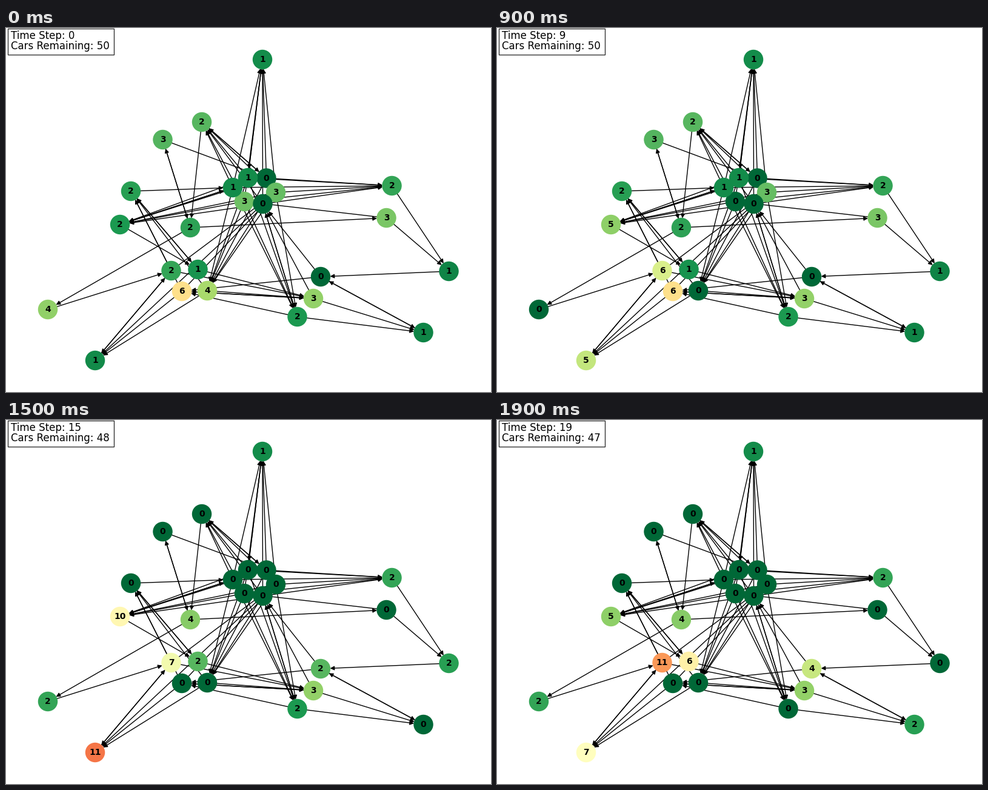
Write a matplotlib script that moves like this. It is 800 px wide and 600 px high and loops after 2000 ms.

```python
import matplotlib.pyplot as plt
from matplotlib.animation import FuncAnimation
from matplotlib.patches import FancyArrowPatch, Rectangle

W, H, DPI = 800, 600, 100
STEPS, STEP_MS = 20, 100
NODE_SIZE = 500

# junction: x, y, capacity, cars at the start
NODES = {
    "A": (423, 52, 13, 1), "B": (323, 155, 11, 2), "C": (258.5, 184, 17, 3),
    "H": (393, 286, 14, 3), "F": (374, 263, 13, 1), "E": (429.5, 247.5, 14, 0),
    "D": (399, 247, 13, 1), "G": (445, 271, 15, 3), "I": (423.5, 290, 12, 0),
    "J": (206, 269, 17, 2), "K": (188, 324, 19, 2), "L": (304, 329, 16, 2),
    "M": (636.5, 260, 15, 2), "N": (627.5, 313, 13, 3), "O": (730.5, 401, 17, 1),
    "P": (519, 410, 11, 0), "Q": (507, 446, 11, 3), "R": (480.5, 476, 19, 2),
    "S": (688.5, 502, 17, 1), "T": (272.5, 400, 15, 2), "U": (316.5, 398, 11, 1),
    "V": (290, 434, 10, 6), "W": (332, 433, 13, 4), "X": (69, 464, 15, 4),
    "Y": (147, 548, 14, 1),
}

# roads leaving each junction
ROADS = {
    "D": "ABKMWR", "E": "ABKMW", "F": "ABKMWR", "G": "ABKMWR",
    "H": "ABKMWR", "I": "ABKMWRY", "A": "D", "B": "EL", "C": "EL",
    "J": "FU", "K": "FU", "L": "CXN", "M": "O", "N": "HO", "O": "P",
    "P": "SVI", "Q": "VIS", "R": "ISV", "S": "P", "T": "JGYQ",
    "U": "JQ", "V": "JGYQ", "W": "JQY", "X": "T", "Y": "T",
}

# time step: junctions whose car count changes
CHANGES = {
    4: dict(H=0, K=5),
    8: dict(X=0, T=6, W=0, Y=5),
    10: dict(C=0, D=0, G=0, N=1, O=2, L=5, K=9, T=7, Y=4),
    11: dict(F=0, K=10, L=3, X=2),
    12: dict(V=0, Y=10, N=0, P=2, S=0),
    14: dict(B=0, L=4),
    15: dict(J=0, U=2, Y=11),
    18: dict(R=0, S=2),
    19: dict(O=0, P=4, K=5, U=6, T=11, Y=7),
}
EXITS = (10, 14, 19)

cmap = plt.get_cmap("RdYlGn_r")
fig = plt.figure(figsize=(W / DPI, H / DPI), dpi=DPI, facecolor="white")
ax = fig.add_axes([0, 0, 1, 1])
ax.set_xlim(0, W)
ax.set_ylim(H, 0)
ax.axis("off")

margin = NODE_SIZE ** 0.5 / 2
for start, ends in ROADS.items():
    for end in ends:
        ax.add_patch(FancyArrowPatch(
            NODES[start][:2], NODES[end][:2], arrowstyle="-|>",
            mutation_scale=10, shrinkA=margin, shrinkB=margin,
            linewidth=1, color="black", zorder=1))

xs, ys, caps, _ = zip(*NODES.values())
dots = ax.scatter(xs, ys, s=NODE_SIZE, c="green", linewidths=1,
                  edgecolors="face", zorder=2)
labels = [ax.text(x, y, "", size=10, weight="bold", family="DejaVu Sans",
                  ha="center", va="center", zorder=3) for x, y in zip(xs, ys)]

ax.add_patch(Rectangle((2.5, 0.5), 175, 43.5, facecolor="white",
                       edgecolor="black", linewidth=1, alpha=0.8, zorder=4))
clock, remaining = [ax.text(8, y, "", size=12, family="DejaVu Sans",
                            va="baseline", zorder=5) for y in (18, 35)]


def counts_at(step):
    counts = {name: node[3] for name, node in NODES.items()}
    for when, change in CHANGES.items():
        if when <= step:
            counts.update(change)
    return list(counts.values())


def draw(step):
    counts = counts_at(step)
    colors = [cmap(n / cap) for n, cap in zip(counts, caps)]
    dots.set_facecolor(colors)
    dots.set_edgecolor(colors)
    for label, n in zip(labels, counts):
        label.set_text(str(n))
    clock.set_text(f"Time Step: {step}")
    remaining.set_text(f"Cars Remaining: {50 - sum(step >= t for t in EXITS)}")
    return [dots, clock, remaining, *labels]


anim = FuncAnimation(fig, draw, frames=STEPS, interval=STEP_MS,
                     repeat=True, repeat_delay=0)
plt.show()
```
